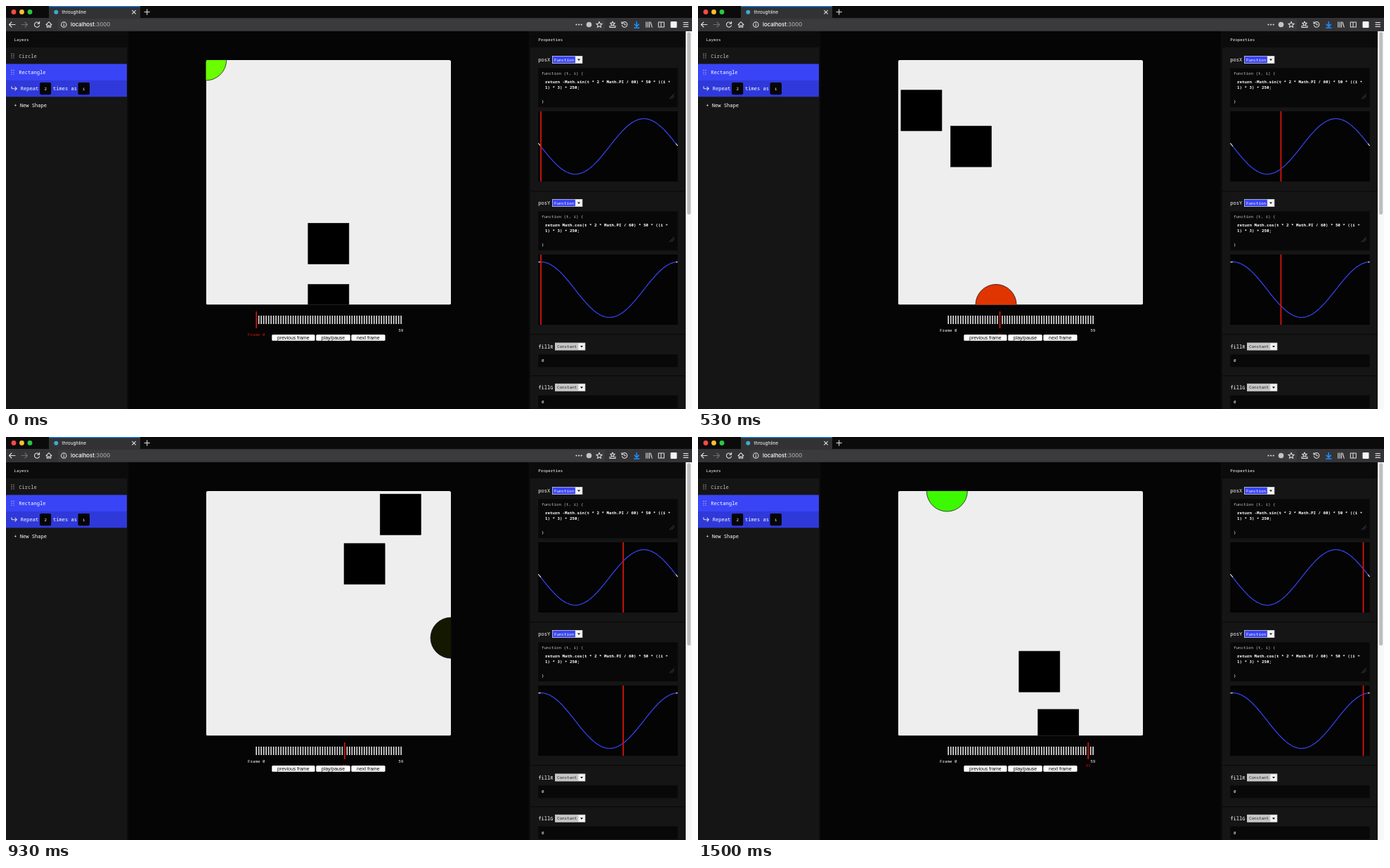
Animation, 976 px wide and 574 px high, one loop 1.53 s. Source, as an HTML page:

```html
<!DOCTYPE html>
<html lang="en">
<head>
<meta charset="utf-8">
<title>throughline</title>
<style>
  html, body { margin: 0; width: 100%; height: 100%; overflow: hidden; background: #050505; }
  svg { display: block; width: 976px; height: 574px; }
  text { font: 500 5.83px "Noto Sans Mono", "DejaVu Sans Mono", monospace; fill: #fff; white-space: pre; }
  .big { font-size: 7.1px; }
  .bold { font-weight: 600; }
  .dim { fill: #c4c4c4; }
  .dark { fill: #222; }
  .mid { text-anchor: middle; }
  .ui { font: 6.5px Inter, sans-serif; }
  .url { font: 500 7.8px Inter, sans-serif; }
  .button { font: 6.9px "Liberation Sans", Arial, sans-serif; fill: #000; text-anchor: middle; }
  .line { fill: none; stroke: #dcdcdd; stroke-width: 1.1; stroke-linecap: round; stroke-linejoin: round; }
</style>
</head>
<body>
<svg id="app" viewBox="0 0 976 574"></svg>
<script>
const FRAMES = 60, STAGE = { x: 284.6, y: 77, size: 348.5 }, SCALE = STAGE.size / 600;
const LOOP = 1530, STEP = 100 / 3;
const BLUE = '#3944f6', RED = '#d5140e';

const rect = (x, y, w, h, fill, r = 0, extra = '') =>
  `<rect x="${x}" y="${y}" width="${w}" height="${h}" fill="${fill}" rx="${r}" ${extra}/>`;
const text = (x, y, s, cls = '', extra = '') => `<text x="${x}" y="${y}" class="${cls}" ${extra}>${s}</text>`;
const dot = (x, y, r, fill) => `<circle cx="${x}" cy="${y}" r="${r}" fill="${fill}"/>`;
const line = (d, extra = '') => `<path class="line" d="${d}" ${extra}/>`;
const range = (n, f) => Array.from({ length: n }, (_, i) => f(i)).join('');
const angle = t => t * 2 * Math.PI / FRAMES;

const tickX = t => 356.2 + 3.49 * t;
const graphX = t => 761 + 3.255 * t;

function browserChrome() {
  return rect(0, 0, 976, 17, '#0b0b0c') + rect(61, 0, 130, 17, '#323234') + rect(61, 0, 130, 1.2, '#0a84ff') +
    rect(0, 17, 976, 19, '#343436') + rect(74, 18.5, 778, 16, '#3b3b3d', 1.5) +
    dot(11, 8.5, 3.4, '#fc4a46') + dot(22.5, 8.5, 3.4, '#fcc02c') + dot(34, 8.5, 3.4, '#2bc840') +
    dot(71.3, 8.8, 3, '#3fa9cf') + text(79.5, 11.2, 'throughline', 'ui') +
    line('M179.6 6.4l4.8 4.8m0-4.8l-4.8 4.8M197 8.5h7.4m-3.7-3.7v7.4') +
    line('M13 26.5H4.5m3.5-3.5l-3.5 3.5 3.5 3.5') +
    line('M22 26.5h8.5m-3.5-3.5l3.5 3.5-3.5 3.5', 'opacity=".35"') +
    line('M47 24.4a3.6 3.6 0 1 0 .5 3.3M47.6 22.3v2.8h-2.8') +
    line('M57 26.6l4-3.9 4 3.9M58.3 26v4.2h1.8v-2.4h1.8v2.4h1.8V26') +
    line('M86 26.5a3.7 3.7 0 1 1-7.4 0a3.7 3.7 0 1 1 7.4 0M82.3 26v2.4m0-4v.1', 'stroke-width=".8"') +
    text(92, 29.3, 'localhost<tspan fill="#a5a5a8">:3000</tspan>', 'url') +
    range(3, i => dot(811.5 + 3.6 * i, 26.5, 1.1, '#dcdcdd')) + dot(829.5, 26.5, 3.8, '#c4c4c6') +
    line('M844 22.3l1.2 2.8 3 .3-2.3 2 .7 3-2.6-1.6-2.6 1.6.7-3-2.3-2 3-.3z') +
    line('M863 22l1 2.2 2.3.2-1.7 1.6.5 2.2-2.1-1.2-2.1 1.2.5-2.2-1.7-1.6 2.3-.2zM859 28v2.4h8V28') +
    line('M876.7 24.6a3.8 3.8 0 1 1-.3 2.8M876 22.6v2.4h2.4M880 24.5v2.3h1.8') +
    line('M897.3 22.5v6.6m-3-3l3 3 3-3M893.8 31h7', 'style="stroke:#1d8fff;stroke-width:1.5"') +
    line('M910.8 22.8v7.4m2.4-7.4v7.4m2.3-7.4v7.4m1.5-7.2l2.2 7.2') +
    line('M928.3 23h8v7h-8zM932 23v7') +
    rect(945.5, 22, 9, 9, '#f4f4f4', 1) +
    line('M964 23.6h6.5m-6.5 2.9h6.5m-6.5 2.9h6.5');
}

const grip = y => range(6, i => dot(8 + i % 2 * 3, y - 2.8 + 2.8 * (i >> 1), .65, '#d0d0d0'));

function layersPanel() {
  return rect(0, 36, 172.5, 538, '#151515') + rect(0, 36, 172.5, 23, '#0b0b0b') + rect(172.5, 36, 1.7, 538, '#0d0d0d') +
    text(11.6, 50, 'Layers') + grip(71) + text(18.2, 73.6, 'Circle', 'big dim') +
    rect(0, 82.5, 172, 23.5, BLUE) + rect(0, 106, 172, 23.3, '#2f39d9') + grip(94.3) +
    text(18.2, 96.9, 'Rectangle', 'big') +
    line('M8 114.8v1.6q0 1.3 1.3 1.3h6m-2.3-2.3l2.3 2.3-2.3 2.3', 'stroke-width=".8"') +
    text(20.7, 120.2, 'Repeat', 'big') + text(67, 120.2, 'times as', 'big') +
    rect(48, 109, 16.2, 17.2, '#050505', 1.8) + rect(102.5, 109, 16.5, 17.2, '#050505', 1.8) +
    text(56.2, 119.8, '2', 'mid') + text(110.8, 119.8, 'i', 'mid') + text(11.3, 143.6, '+ New Shape', 'big');
}

function propertyHead(y, name, kind, x) {
  const isFunction = kind === 'Function';
  return text(757.2, y + 2.6, name, 'big') +
    rect(x, y - 5.5, 43.3, 11, '#c6c6c8') + rect(x + .8, y - 4.7, 32, 9.4, isFunction ? BLUE : '#c6c6c8') +
    rect(x + 33.3, y - 4.7, 9.2, 9.4, '#f2f2f2') + text(x + 3, y + 2, kind, isFunction ? '' : 'dark') +
    `<path d="M${x + 36} ${y - 1}h4l-2 2.6z" fill="#111"/>`;
}

function functionProperty(top, name, code, wave) {
  const mid = top + 123.5;
  const curve = (from, to) => 'M' + Array.from({ length: 121 }, (_, i) => {
    const t = from + (to - from) * i / 120;
    return graphX(t).toFixed(2) + ' ' + (mid + 39.5 * wave(angle(t))).toFixed(2);
  }).join('L');
  const path = (from, to, color) => `<path d="${curve(from, to)}" fill="none" stroke="${color}" stroke-width="1.2"/>`;
  return propertyHead(top, name, 'Function', 777) +
    rect(757.3, top + 12, 198.3, 55.7, '#080808') +
    text(762, top + 21.5, 'function (t, i) {', 'dim') +
    text(767, top + 33, code, 'bold') + text(767, top + 41, '1) * 3) + 250;', 'bold') + text(762, top + 61.7, '}') +
    line(`M944 ${top + 55.5}l6.5-6.5m-3.7 6.5l3.7-3.7`, 'style="stroke:#555;stroke-width:.8"') +
    rect(757.3, top + 73.5, 198.3, 100, '#040404') +
    path(-1.1, 0, '#ddd') + path(0, 59, BLUE) + path(59, 59.8, '#ddd') +
    rect(0, top + 73.5, 1.8, 100, RED, 0, 'class="cursor"') +
    rect(746, top + 186.5, 221, 1.3, '#0a0a0a');
}

const constantProperty = (y, name) => propertyHead(y, name, 'Constant', 781) +
  rect(757.3, y + 11.3, 198.3, 18, '#080808') + text(762, y + 22.2, '0') + rect(746, y + 41, 221, 1.3, '#0a0a0a');

function propertiesPanel() {
  return rect(744, 36, 2, 538, '#0d0d0d') + rect(746, 36, 221, 538, '#151515') + rect(746, 36, 221, 23, '#0b0b0b') +
    text(757.2, 50, 'Properties') +
    functionProperty(76.5, 'posX', 'return -Math.sin(t * 2 * Math.PI / 60) * 50 * ((i +', Math.sin) +
    functionProperty(280.5, 'posY', 'return Math.cos(t * 2 * Math.PI / 60) * 50 * ((i +', a => -Math.cos(a)) +
    constantProperty(485, 'fillR') + constantProperty(543.3, 'fillG') +
    rect(967, 36, 9, 538, '#f8f8f8') + rect(969.2, 37, 5, 260, '#bdbdbd', 2.5);
}

const button = (x, w, label) => rect(x, 468, w, 8.8, '#fff', 1.6) + text(x + w / 2, 474.6, label, 'button');

function player() {
  const box = `x="${STAGE.x}" y="${STAGE.y}" width="${STAGE.size}" height="${STAGE.size}"`;
  const square = rect(0, 0, 100, 100, '#000', 0, 'class="square" stroke="#000"');
  return `<clipPath id="stage"><rect ${box} rx="2.5"/></clipPath>` +
    `<g clip-path="url(#stage)"><rect ${box} fill="#eee"/>
      <g transform="translate(${STAGE.x} ${STAGE.y}) scale(${SCALE})">${square + square}
      <circle id="ball" r="50" stroke="#000" stroke-width="1.2"/></g></g>` +
    range(FRAMES, t => rect(tickX(t) - .8, 441, 1.6, 12, '#e4e4e4', 0, 'class="tick"')) +
    text(tickX(0), 463.6, 'Frame 0', 'mid', 'id="first"') + text(tickX(59) - .4, 463.6, '59', 'mid', 'id="last"') +
    text(0, 469.6, '', 'mid', `id="current" style="fill:${RED}"`) +
    button(378.3, 61.2, 'previous frame') + button(441.2, 48.5, 'play/pause') + button(491.3, 48.2, 'next frame');
}

const app = document.getElementById('app');
app.innerHTML = rect(0, 0, 976, 574, '#050505') + browserChrome() + layersPanel() + propertiesPanel() + player();

const set = (el, attrs) => { for (const k in attrs) el.setAttribute(k, attrs[k]); };
const all = selector => [...app.querySelectorAll(selector)];
const get = id => document.getElementById(id);
const squares = all('.square'), ticks = all('.tick'), cursors = all('.cursor');
const ball = get('ball'), first = get('first'), last = get('last'), current = get('current');

// Playback runs slightly unevenly: [screen step, timeline position]
const PACE = [[0, 0], [7, 10], [16, 21], [23, 31], [34, 43], [41, 52], [45, 57]];
function positionAt(step) {
  const i = Math.max(1, PACE.findIndex(p => p[0] >= step));
  const [s0, t0] = PACE[i - 1], [s1, t1] = PACE[i];
  return Math.round(t0 + (t1 - t0) * (step - s0) / (s1 - s0));
}

// Counterclockwise path around the stage edge, 15 positions per side
function edgePoint(t) {
  const d = t % 15 * 40;
  return [[0, d], [d, 600], [600, 600 - d], [600 - d, 0]][Math.floor(t / 15)];
}

function show(t) {
  const a = angle(t), sin = Math.sin(a), cos = Math.cos(a);
  squares.forEach((el, i) => {
    const r = 150 * (i + 1);
    set(el, { x: 250 - sin * r, y: 250 + cos * r });
  });
  const [cx, cy] = edgePoint(t);
  const red = Math.max(0, Math.min(255, Math.round(106 + 146 * sin)));
  set(ball, { cx, cy, fill: `rgb(${red},${Math.round(127.5 + 127.5 * cos)},0)` });
  ticks.forEach((el, i) => set(el, i === t
    ? { y: 435, height: 24, fill: RED }
    : { y: 441, height: 12, fill: '#e4e4e4' }));
  cursors.forEach(el => set(el, { x: graphX(t) - .9 }));
  [[first, 0], [last, 59]].forEach(([el, n]) => {
    set(el, { y: t === n ? 469.6 : 463.6 });
    el.style.fill = t === n ? RED : '#fff';
  });
  set(current, { x: tickX(t) });
  current.textContent = t === 0 || t === 59 ? '' : t;
}

function tick() {
  const ms = performance.now() % LOOP;
  // Steps of a thirtieth of a second, on a 10 ms clock
  show(positionAt(Math.min(45, Math.floor((ms + 4) / STEP))));
  requestAnimationFrame(tick);
}
tick();
</script>
</body>
</html>
```
